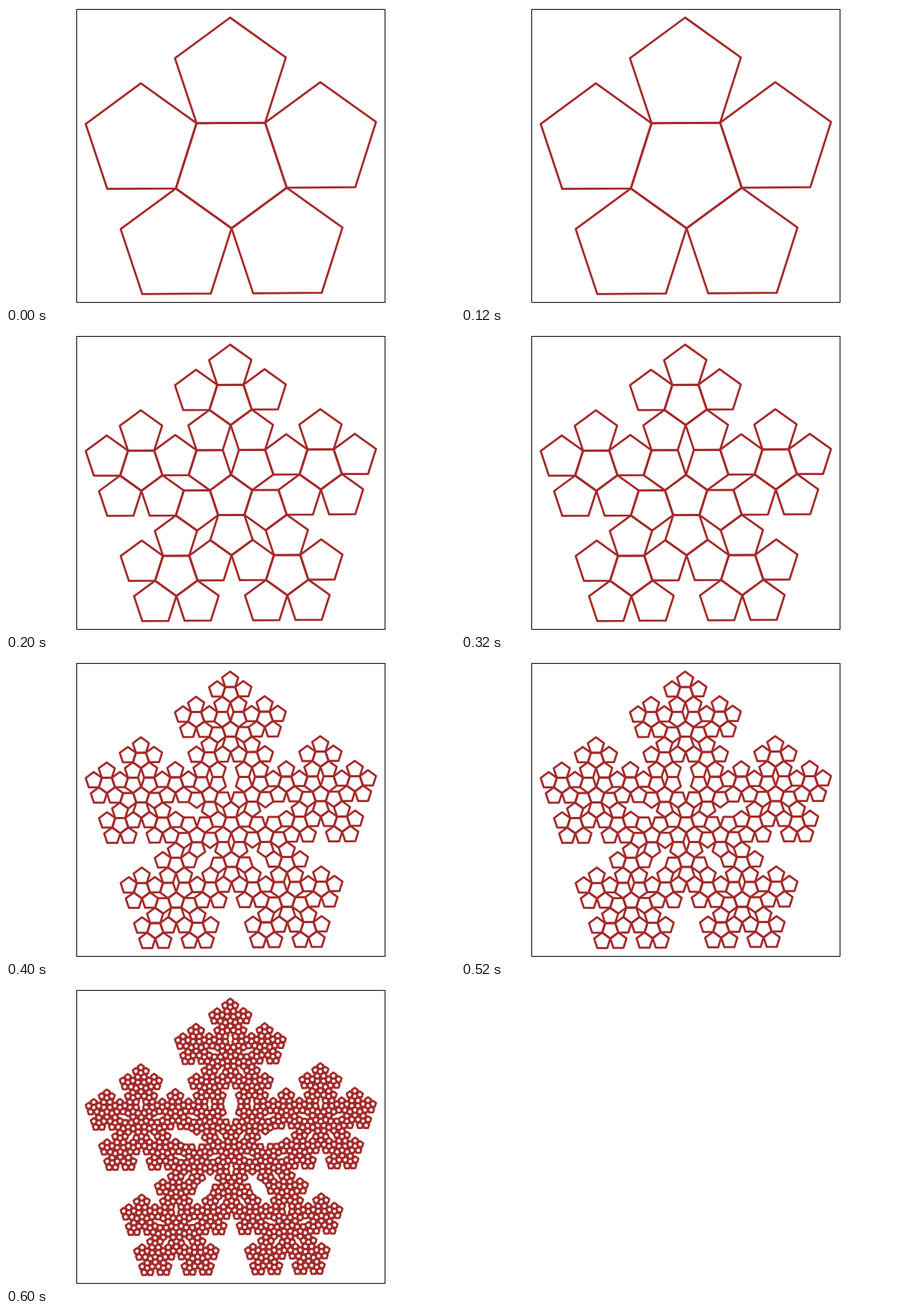
These frames come from a looping animation (600 px wide and 400 px high, 0.8 s). An HTML page with a canvas:

```html
<!DOCTYPE html>
<html lang="en">
<head>
<meta charset="utf-8">
<title>Pentaflake</title>
<style>
  html, body { margin: 0; width: 100%; height: 100%; overflow: hidden; background: #fff; }
  canvas { display: block; }
</style>
</head>
<body>
<canvas id="stage" width="600" height="400"></canvas>
<script>
const ctx = document.getElementById('stage').getContext('2d');
const STEP = 200;
const LEVELS = 4;
const TURN = Math.PI * 2 / 5;
const SHRINK = (3 - Math.sqrt(5)) / 2;
const TILT = -Math.PI / 2 - 0.0068;

function corner(x, y, r, angle, i) {
  const a = angle + i * TURN;
  return [x + r * Math.cos(a), y + r * Math.sin(a)];
}

function pentagon(x, y, r, angle) {
  ctx.beginPath();
  for (let i = 0; i < 5; i++) ctx.lineTo(...corner(x, y, r, angle, i));
  ctx.closePath();
  ctx.stroke();
}

// Five copies in the corners, plus one upside down in the middle.
function flake(x, y, r, angle, depth) {
  if (depth === 0) return pentagon(x, y, r, angle);
  const size = r * SHRINK;
  for (let i = 0; i < 5; i++) {
    flake(...corner(x, y, r - size, angle, i), size, angle, depth - 1);
  }
  flake(x, y, size, angle + Math.PI, depth - 1);
}

function draw(level) {
  ctx.fillStyle = '#fff';
  ctx.fillRect(0, 0, 600, 400);
  ctx.strokeStyle = '#a52a2a';
  ctx.lineWidth = 2.78;
  ctx.lineJoin = 'round';
  flake(300.9, 219.5, 204, TILT, level);
  ctx.strokeStyle = '#000';
  ctx.lineWidth = 1;
  ctx.lineJoin = 'miter';
  ctx.strokeRect(94.5, 4.5, 412, 392);
}

let shown = 0;
function tick() {
  const level = 1 + Math.floor(performance.now() / STEP) % LEVELS;
  if (level !== shown) draw(shown = level);
  requestAnimationFrame(tick);
}
tick();
</script>
</body>
</html>
```
